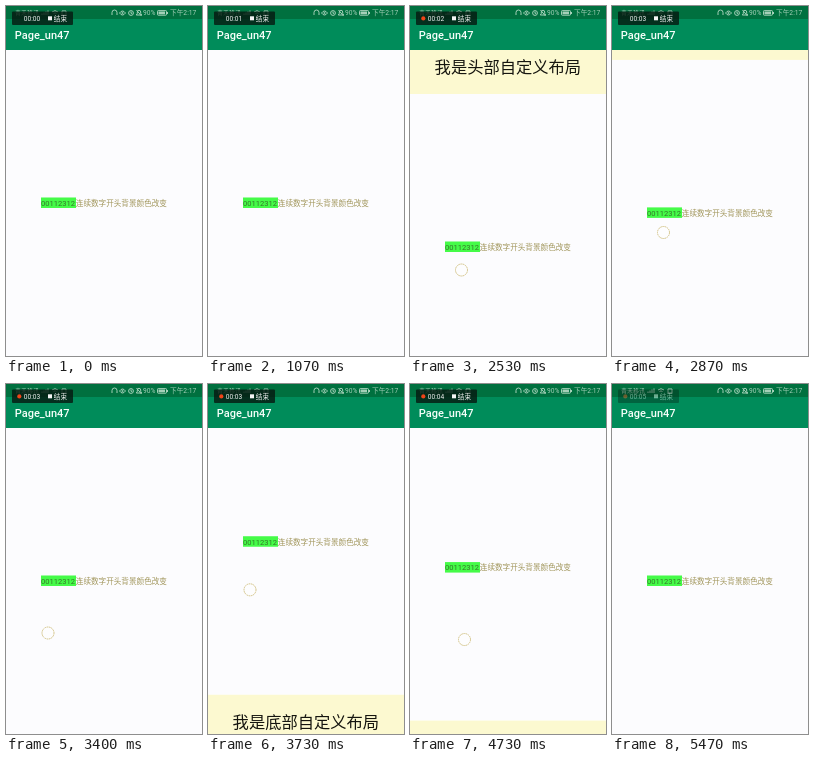
These frames come from a looping animation (196x350 px, 5540 ms). An HTML page:

```html
<!DOCTYPE html>
<html lang="zh">
<head>
<meta charset="utf-8">
<style>
html, body { margin: 0; width: 100%; height: 100%; overflow: hidden; background: #fcfcfe; }
svg { display: block; width: 100vw; height: 100vh; }
text { font-family: Roboto, "Noto Sans CJK SC", "Noto Sans CJK", sans-serif; white-space: pre; }
.big { font-size: 16.3px; fill: #15150f; }
.line { font-size: 7.6px; fill: #a0955a; }
.status { font-size: 6.7px; fill: #a4d0b8; }
.icon { fill: none; stroke: #a4d0b8; stroke-width: 1; }
.pill { font-size: 6.6px; fill: #f4f4f4; }
</style>
</head>
<body>
<svg viewBox="0 0 196 350">
  <rect width="196" height="350" fill="#fcfcfe"/>
  <g id="content">
    <rect x="35" y="191.5" width="35" height="10.5" fill="#45fb48"/>
    <text class="line" x="35" y="199.8" style="fill:#35772a">00112312</text>
    <text class="line" x="69.8" y="199.8">连续数字开头背景颜色改变</text>
  </g>
  <g id="header">
    <rect width="196" height="44" fill="#fcf9d0"/>
    <text class="big" x="24.6" y="23">我是头部自定义布局</text>
    <g id="dots" fill="#7c774f">
      <circle cx="92.5" cy="36"/><circle cx="98" cy="36"/><circle cx="103.5" cy="36"/>
    </g>
  </g>
  <g id="footer">
    <rect width="196" height="44" fill="#fcf9d0"/>
    <text class="big" x="24.6" y="33.7">我是底部自定义布局</text>
  </g>
  <circle id="touch" r="6" fill="#fff" fill-opacity=".3" stroke="#cdbb78" stroke-width=".9" stroke-dasharray="1.6 .6"/>
  <rect width="196" height="44" fill="#008c5a"/>
  <rect width="196" height="13" fill="#00703f"/>
  <text x="8.8" y="32.6" font-size="11" font-weight="500" fill="#f6fffa">Page_un47</text>

  <text class="status" x="9" y="9.4" style="font-size:6px">青禾移讯</text>
  <path class="icon" d="M36 9V7.5M38 9V6.5M40 9V5.5M42 9V4.5M46 6q3-2.5 6 0M47.5 7.5q1.5-1.2 3 0M56 5h4v4h-4z"/>
  <path class="icon" d="M106 9V6.5a2.5 2.5 0 0 1 5 0V9M113.5 7q3-4 6 0q-3 4-6 0M125 5.5V7.3h1.2M130.3 9h5.4l-1-1.5V6a1.7 1.7 0 0 0-3.4 0v1.5zM130.5 4l5 6"/>
  <circle class="icon" cx="116.5" cy="7" r=".7"/>
  <circle class="icon" cx="125" cy="7" r="2.4"/>
  <text class="status" x="137" y="9.4">90%</text>
  <rect class="icon" x="151.5" y="4.6" width="9" height="4.6" rx=".7"/>
  <path fill="#a4d0b8" d="M152.5 5.6h6.5v2.6h-6.5zM161 6h1v2h-1z"/>
  <text class="status" x="164" y="9.4">下午2:17</text>

  <g id="pill">
    <rect x="6" y="5.5" width="61" height="13.5" rx="1" fill="#06180f" fill-opacity=".8"/>
    <circle id="rec" cx="13.3" cy="12.4" r="2.1" fill="#f04418"/>
    <text class="pill" id="clock" x="17.8" y="14.8"></text>
    <rect x="42" y="10.3" width="4" height="4" fill="#f4f4f4"/>
    <text class="pill" x="47.8" y="14.8">结束</text>
  </g>
</svg>
<script>
const LOOP = 5540;
const $ = id => document.getElementById(id);
const clamp = v => Math.min(1, Math.max(0, v));
const ease = u => u * u * (3 - 2 * u);

// A drag starts at (x, y) and moves the page by `pull` pixels
const drags = [
  { start: 1500, time: 570, x: 51, y: 182, pull: 44 },
  { start: 2580, time: 420, x: 51.5, y: 264, pull: -44 },
  { start: 3420, time: 380, x: 42, y: 249, pull: -43 },
  { start: 4530, time: 320, x: 54.5, y: 223, pull: 43 }
];
const moved = (drag, t) => drag.pull * ease(clamp((t - drag.start) / drag.time));
const held = (drag, t) => t > drag.start - 80 && t < drag.start + drag.time * .85;

const shift = (id, y) => $(id).setAttribute('transform', `translate(0 ${y})`);
const show = (id, on) => $(id).setAttribute('visibility', on ? 'visible' : 'hidden');

function draw(t) {
  const offset = drags.reduce((sum, drag) => sum + moved(drag, t), 0);
  shift('content', offset);
  shift('header', Math.max(0, offset));
  shift('footer', 350 + Math.min(0, offset));

  show('dots', held(drags[0], t));
  [...$('dots').children].forEach((dot, i) => {
    const wave = Math.cos((t - 1730) / 120 - (i - 1) * 1.7);
    dot.setAttribute('r', 2.3 + .6 * wave);
  });

  const drag = drags.find(d => held(d, t));
  show('touch', drag);
  if (drag) {
    $('touch').setAttribute('cx', drag.x);
    $('touch').setAttribute('cy', drag.y + 1.1 * moved(drag, t));
  }

  const beat = t % 1000;
  show('rec', beat >= 265 && beat < 800);
  $('clock').textContent = '00:0' + Math.floor((t + 200) / 1000);
  $('pill').setAttribute('opacity', 1 - .6 * clamp((t - 5190) / 300));
}

const start = performance.now();
function tick() {
  draw((performance.now() - start) % LOOP);
  requestAnimationFrame(tick);
}
tick();
</script>
</body>
</html>
```
